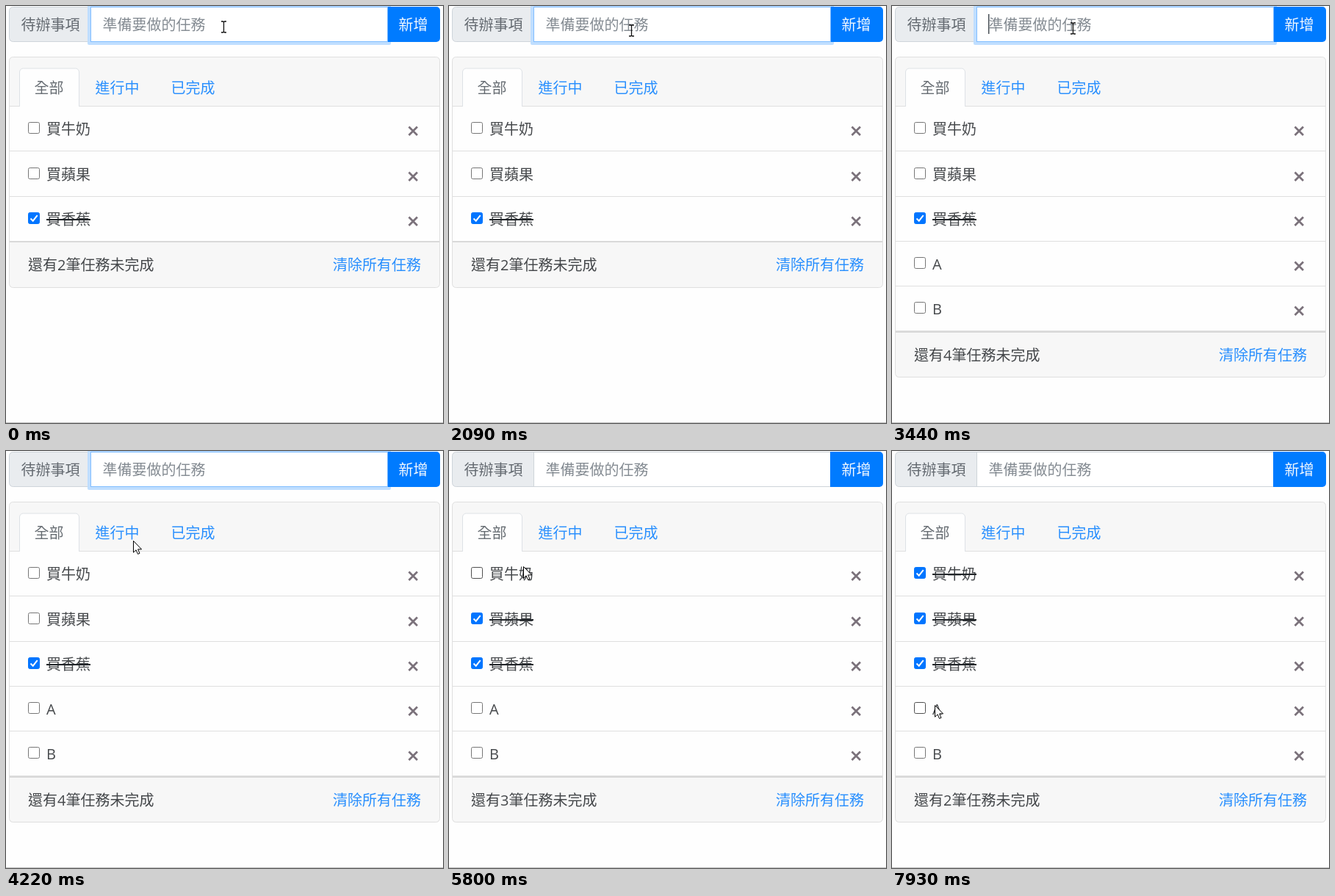
Recreate the animation shown at these times as an HTML page. Size 595 by 568 pixels, loop 8000 ms.

```html
<!DOCTYPE html>
<html lang="zh-Hant">
<head>
<meta charset="utf-8">
<title>待辦事項</title>
<style>
  html, body { margin: 0; width: 100%; height: 100%; overflow: hidden; background: #fefefe; }
  svg { display: block; width: 100%; height: 100%; }
  text { font: 400 20px "Open Sans", "Noto Sans CJK TC", "Noto Sans CJK", sans-serif; fill: #212529; fill-opacity: .84; }
  .link { fill: #007bff; }
  .muted { fill: #495057; }
  .line { stroke: #dfdfdf; fill: none; }
  .cross { stroke: #7b727b; stroke-width: 2.8; fill: none; }
  .tick { stroke: #fff; stroke-width: 2; fill: none; }
  .strike { stroke: #212529; stroke-width: 2; }
</style>
</head>
<body>
<svg viewBox="0 0 595 568">
  <path d="M115.5 1.5H9.5a5 5 0 0 0-5 5v37a5 5 0 0 0 5 5h106z" fill="#e9ecef" stroke="#ced4da"/>
  <text x="20.5" y="32.5" class="muted">待辦事項</text>
  <rect id="ring" rx="2" fill="#bfdeff"/>
  <rect id="field" x="115.5" y="1.5" width="404" height="47" fill="#fff"/>
  <path d="M519 1h67a5 5 0 0 1 5 5v38a5 5 0 0 1-5 5h-67z" fill="#007bff"/>
  <path id="edge" d="M519.5 1V49" stroke="#80bdff"/>
  <text x="534.5" y="32.5" style="fill:#fff;fill-opacity:.95">新增</text>
  <text id="entry" x="131.5" y="32.5"></text>
  <rect id="caret" y="11" width="1.5" height="27" fill="#495057"/>

  <path d="M5 136V74a4 4 0 0 1 4-4h577a4 4 0 0 1 4 4v62z" fill="#f7f7f7"/>
  <path d="M5 136.5H590" class="line"/>
  <path d="M18.5 137V90a5 5 0 0 1 5-5h71a5 5 0 0 1 5 5v47" fill="#fefefe" stroke="#dee2e6"/>
  <text x="38.5" y="118.5" class="muted">全部</text>
  <text x="121.5" y="118.5" class="link">進行中</text>
  <text x="224.5" y="118.5" class="link">已完成</text>

  <g id="rows"></g>
  <g id="footer">
    <path d="M5 321h585v58a4 4 0 0 1-4 4H9a4 4 0 0 1-4-4z" fill="#f7f7f7"/>
    <path d="M5 321H590" stroke="#d9d9d9" stroke-width="2"/>
    <text id="count" x="30" y="360"></text>
    <text x="445" y="360" class="link">清除所有任務</text>
  </g>
  <rect id="card" x="4.5" y="69.5" width="586" rx="5" class="line"/>
  <path d="M0 567.5H595" stroke="#c4c4c4"/>

  <path id="arrow" d="M.5.5V16.2L4.1 12.8 6.5 18.4 9 17.4 6.6 11.9H11.6z" fill="#fff" stroke="#000"/>
  <path id="beam" d="M-3.5-7.5H-1L0-6.5 1-7.5H3.5M0-6.5V6.5M-3.5 7.5H-1L0 6.5 1 7.5H3.5" fill="none" stroke="#111" stroke-width="1.3"/>
  <circle id="press" r="15" fill="#ff0" fill-opacity=".55"/>
</svg>
<script>
const LOOP = 8000;
const ROW = 61.25;
const BLUR = 4930;
const $ = id => document.getElementById(id);
const set = (el, attrs) => Object.entries(attrs).forEach(([key, value]) => el.setAttribute(key, value));
const show = (el, on) => set(el, { visibility: on ? 'inherit' : 'hidden' });
const place = (el, x, y) => set(el, { transform: `translate(${x} ${y})` });
const within = (t, from, to) => t >= from && t < to;

// added / done: moments when a task appears and gets ticked
const tasks = [
  { name: '買牛奶', added: 0, done: 6830 },
  { name: '買蘋果', added: 0, done: 5170 },
  { name: '買香蕉', added: 0, done: 0 },
  { name: 'A', added: 2880, done: Infinity },
  { name: 'B', added: 3440, done: Infinity }
];

// path points: [progress, x, y]
const moves = [
  { start: 210, end: 920, steps: 10, path: [[0, 296, 28], [.2, 266, 48], [.5, 170, 118], [.8, 108, 163], [1, 97, 170]] },
  { start: 1700, end: 2340, steps: 9, path: [[0, 97, 170], [.22, 108, 206], [.45, 205, 92], [.667, 248, 33], [1, 246, 30]] },
  { start: 3980, end: 4620, steps: 9, path: [[0, 246, 30], [.2, 228, 52], [.5, 160, 138], [.8, 116, 208], [1, 110, 220]] },
  { start: 5570, end: 6280, steps: 10, path: [[0, 110, 220], [.2, 108, 196], [.4, 101, 157], [.6, 97, 148], [1, 92, 166]] },
  { start: 6440, end: 6441, steps: 1, path: [[0, 92, 166], [1, 91, 165]] },
  { start: 7450, end: 7930, steps: 7, path: [[0, 91, 165], [.3, 84, 205], [.7, 66, 315], [1, 58, 346]] }
];
const presses = [[BLUR, 5170], [6670, 6900]];
const carets = [[330, 860], [1390, 1920], [2340, 3980], [4540, BLUR]];

function pointer(t) {
  const move = moves.filter(m => t >= m.start).pop();
  if (!move) return moves[0].path[0].slice(1);
  const { start, end, steps, path } = move;
  const gap = (end - start) / Math.max(1, steps - 1);
  const p = Math.min(1, (Math.floor((t - start) / gap + .2) + 1) / steps);
  const i = Math.max(1, path.findIndex(point => point[0] >= p - 1e-6));
  const [a, b] = [path[i - 1], path[i]];
  const k = (p - a[0]) / (b[0] - a[0]);
  return [1, 2].map(n => Math.round(a[n] + (b[n] - a[n]) * k));
}

tasks.forEach((task, i) => {
  task.y = Math.round(166.3 + ROW * i);
  $('rows').insertAdjacentHTML('beforeend', `<g transform="translate(0 ${task.y})">
    <rect x="30.5" y="-7.5" width="15" height="15" rx="2"/>
    <path class="tick" d="M33.5 .5L36.7 3.7 42.7-3.8"/>
    <text x="55" y="9">${task.name}</text>
    <path class="strike" d="M55 2H115"/>
    <path class="cross" d="M548.5-1.5L560 10M560-1.5L548.5 10"/>
    <path class="line" d="M5 31.5H590"/></g>`);
  task.row = $('rows').lastElementChild;
  [task.box, task.tick, , task.strike] = task.row.children;
});

function drawField(t) {
  const typed = within(t, 2800, 2880) ? 'A' : within(t, 2970, 3440) ? 'B' : '';
  const spread = t < BLUR ? 4 : 3;
  const focused = t < BLUR + 80;
  set($('ring'), { x: 115 - spread, y: 1 - spread, width: 405 + 2 * spread, height: 48 + 2 * spread });
  show($('ring'), focused);
  show($('edge'), t < BLUR);
  set($('field'), { stroke: focused ? '#80bdff' : '#ced4da' });
  $('entry').textContent = typed || '準備要做的任務';
  $('entry').style.fill = typed ? '#495057' : '#6c757d';
  set($('caret'), { x: typed ? 145 : 131 });
  show($('caret'), carets.some(([from, to]) => within(t, from, to)));
}

function drawList(t, x, y, pressed) {
  tasks.forEach(task => {
    const done = t >= task.done;
    const hover = x >= 30 && x <= 116 && Math.abs(y - task.y) < 15;
    const edge = hover ? (pressed ? '#8d8d8d' : '#4f4f4f') : '#767676';
    show(task.row, t >= task.added);
    show(task.tick, done && t >= task.added);
    show(task.strike, done && t >= task.added);
    set(task.box, { fill: done ? '#0075ff' : '#fff', stroke: done ? '#0075ff' : edge });
  });
  const visible = tasks.filter(task => t >= task.added);
  const extra = ROW * (visible.length - 3);
  place($('footer'), 0, Math.round(extra + .4));
  set($('card'), { height: 314 + Math.floor(extra) });
  $('count').textContent = `還有${visible.filter(task => t < task.done).length}筆任務未完成`;
}

function draw(t) {
  const [x, y] = pointer(t);
  const pressed = presses.some(([from, to]) => within(t, from, to));
  const overInput = y < 49 && x > 115 && x < 520;
  drawField(t);
  drawList(t, x, y, pressed);
  place($('press'), x, y);
  place($('arrow'), x, y);
  place($('beam'), x + .5, y + .5);
  show($('press'), pressed);
  show($('arrow'), !overInput);
  show($('beam'), overInput);
}

const begun = performance.now();
function tick() {
  draw((performance.now() - begun) % LOOP);
  requestAnimationFrame(tick);
}
tick();
</script>
</body>
</html>
```
